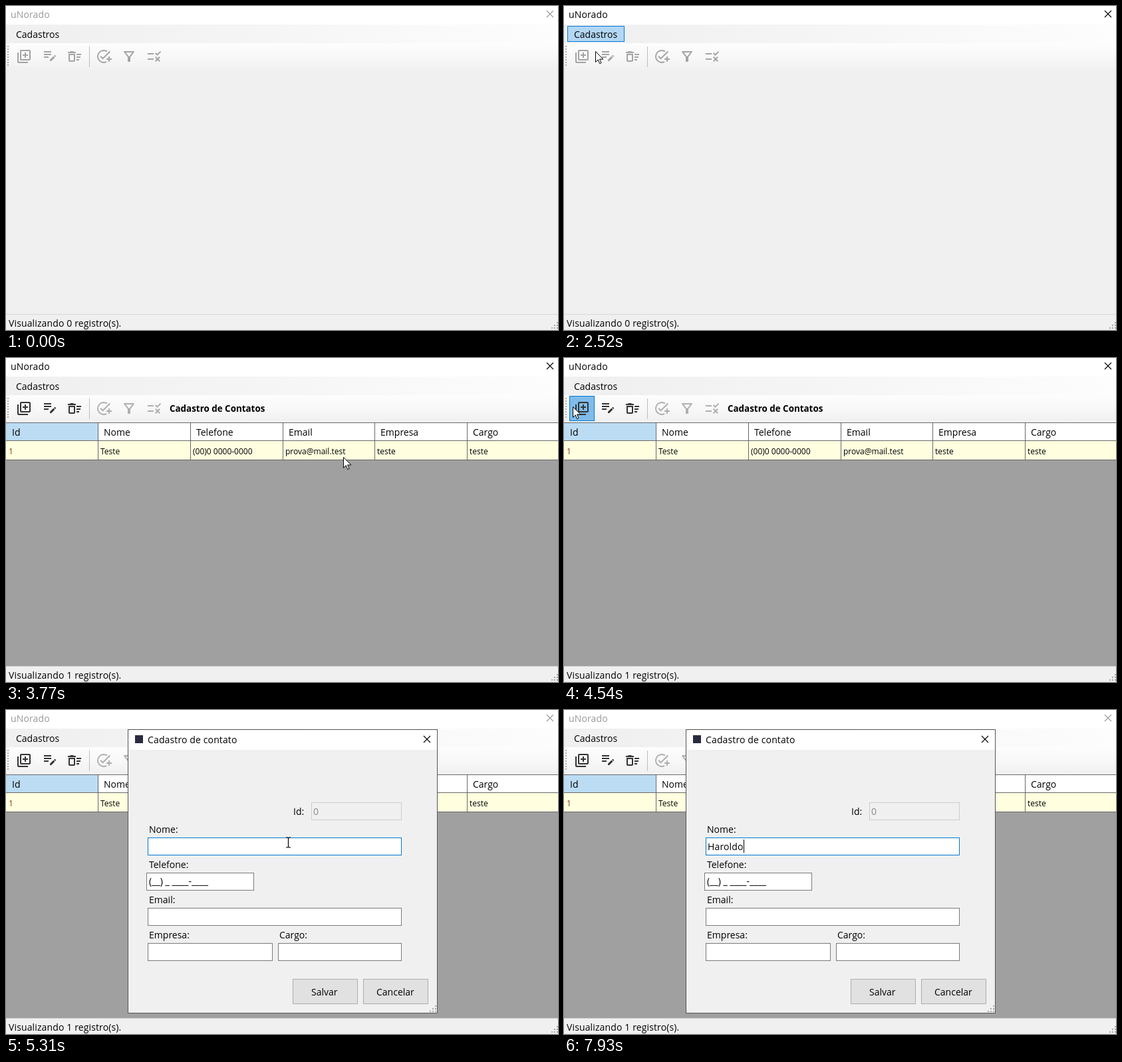
Write an HTML page that moves like this. It is 830x488 px and loops after 8000 ms.

```html
<!DOCTYPE html>
<html lang="pt">
<head>
<meta charset="utf-8">
<style>
html, body { margin: 0; width: 100%; height: 100%; overflow: hidden; background: #f0f0f0; }
svg { display: block; width: 830px; height: 488px; }
text { font: 14px "Open Sans", "Noto Sans", sans-serif; white-space: pre; }
.small { font-size: 12px; }
.bold { font-size: 13.4px; font-weight: 700; }
.wide { letter-spacing: .13px; }
</style>
</head>
<body>
<svg id="stage" viewBox="0 0 830 488">
  <defs>
    <linearGradient id="menuFill"><stop offset=".1" stop-color="#f0f0f0"/><stop offset="1" stop-color="#fdfdfd"/></linearGradient>
    <linearGradient id="toolFill" x2="0" y2="1"><stop offset="0" stop-color="#fdfdfd"/><stop offset=".5" stop-color="#f8f8f8"/><stop offset="1" stop-color="#f0f0f0"/></linearGradient>
  </defs>
</svg>
<script>
const LOOP = 8000, STEP = 70;
const stage = document.getElementById('stage');

function add(parent, tag, attrs, content) {
  const el = document.createElementNS('http://www.w3.org/2000/svg', tag);
  for (const k in attrs) el.setAttribute(k, attrs[k]);
  if (content !== undefined) el.textContent = content;
  return parent.appendChild(el);
}
const group = (parent = stage) => add(parent, 'g', {});
const fillBox = (g, x, y, width, height, fill) => add(g, 'rect', { x, y, width, height, fill });
// Outlined box whose outer edges lie on whole pixels
const frame = (g, x1, y1, x2, y2, fill, stroke) =>
  add(g, 'rect', { x: x1 + .5, y: y1 + .5, width: x2 - x1 - 1, height: y2 - y1 - 1, fill, stroke });
const label = (g, x, y, s, cls = '', fill = '#000') => add(g, 'text', { x, y, fill, class: cls }, s);
const cross = (g, x, y) =>
  add(g, 'path', { d: `M${x} ${y}l10 10m0-10l-10 10`, stroke: '#000', 'stroke-width': 1.1, fill: 'none' });
const show = (el, on) => el.setAttribute('display', on ? 'inline' : 'none');

function sizeGrip(g, x, y) {
  for (let r = 0; r < 3; r++)
    for (let c = 2 - r; c < 3; c++) fillBox(g, x + c * 4 - 1, y + r * 4 - 1, 2, 2, '#a8a8a8');
}

// Window
const win = group();
fillBox(win, 0, 0, 830, 28, '#fff');
fillBox(win, 0, 28, 830, 28, 'url(#menuFill)');
fillBox(win, 0, 56, 830, 41, 'url(#toolFill)');
const title = label(win, 7, 18, 'uNorado', 'wide');
const closeX = cross(win, 813, 7);
const menuHover = frame(win, 5, 30, 91, 54, '#b3d7f3', '#0078d7');
label(win, 15, 48, 'Cadastros');
for (let y = 60; y < 91; y += 4) fillBox(win, 2, y, 2, 2, '#a9a9a9');
fillBox(win, 125, 61, 1, 31, '#bdbdbd');
fillBox(win, 0, 464, 830, 1, '#d7d7d7');
const status = label(win, 4, 483, '', 'wide');
sizeGrip(win, 821, 477);

// Toolbar
const icons = [
  [15, 64, 'M4 6H2v14c0 1.1.9 2 2 2h14v-2H4V6zm16-4H8c-1.1 0-2 .9-2 2v12c0 1.1.9 2 2 2h12c1.1 0 2-.9 2-2V4c0-1.1-.9-2-2-2zm0 14H8V4h12v12zm-7-2h2v-3h3V9h-3V6h-2v3h-3v2h3z'],
  [54, 62, 'M3 10h11v2H3zM3 8h11V6H3zm0 8h7v-2H3zm15-3.1.7-.7c.4-.4 1-.4 1.4 0l.7.7c.4.4.4 1 0 1.4l-.7.7zm-.7.7L12 18.9V21h2.1l5.3-5.3z'],
  [91, 64, 'M15 16h4v2h-4zm0-8h7v2h-7zm0 4h6v2h-6zM3 18c0 1.1.9 2 2 2h6c1.1 0 2-.9 2-2V8H3zm2-8h6v8H5zm5-6H6L5 5H2v2h12V5h-3z'],
  [135, 64, 'M22 5.2 10.6 16.6l-4.2-4.2L7.8 11l2.8 2.8 10-10zM12 20a8 8 0 1 1 4.3-14.7l1.4-1.5A10 10 0 1 0 16.8 20.8l-1.5-1.5c-1 .5-2.1.7-3.3.7zm7-5h-3v2h3v3h2v-3h3v-2h-3v-3h-2z'],
  [173, 64, 'M7 6h10l-5 6.3zM4.3 5.6 10 13v6c0 .6.4 1 1 1h2c.6 0 1-.4 1-1v-6l5.7-7.4c.5-.7 0-1.6-.8-1.6H5c-.8 0-1.3.9-.7 1.6z'],
  [211, 64, 'M16.5 11 13 7.5 14.4 6l2.1 2.2 4.3-4.3 1.4 1.4zM11 7H2v2h9zm10 6.4L19.6 12 17 14.6 14.4 12 13 13.4l2.6 2.6-2.6 2.6 1.4 1.4 2.6-2.6 2.6 2.6 1.4-1.4-2.6-2.6zM11 15H2v2h9z']
];
const hovers = [8, 46, 84].map(x => frame(win, x, 57, x + 38, 95, '#b3d7f3', '#0078d7'));
const glyphs = icons.map(([x, y, d]) =>
  add(win, 'path', { d, transform: `translate(${x} ${y})`, 'fill-rule': 'evenodd' }));

// Contact list
const grid = group();
label(grid, 246, 81, 'Cadastro de Contatos', 'bold');
fillBox(grid, 0, 97, 830, 367, '#a0a0a0');
fillBox(grid, 0, 97, 830, 28, '#fff');
fillBox(grid, 0, 97, 138, 28, '#bcdcf4');
fillBox(grid, 0, 125, 830, 28, '#ffffe0');
for (const y of [97, 124, 153]) fillBox(grid, 0, y, 830, 1, '#696969');
const edges = [138, 277, 416, 554, 693];
edges.forEach(x => fillBox(grid, x, 97, 1, 57, '#696969'));
const columns = [['Id', '1'], ['Nome', 'Teste'], ['Telefone', '(00)0 0000-0000'],
  ['Email', 'prova@mail.test'], ['Empresa', 'teste'], ['Cargo', 'teste']];
const heads = columns.map(([head, cell], i) => {
  const x = i ? edges[i - 1] : 0;
  label(grid, x + 4, 145, cell, 'small', i ? '#000' : '#8b3a10');
  return label(grid, x + 9, 117, head);
});
const headGap = fillBox(grid, 693, 98, 1, 26, '#e8e8e8');

// Dialog
const dialog = group();
frame(dialog, 183, 29, 649, 457, '#f0f0f0', '#555');
fillBox(dialog, 184, 30, 464, 30, '#fff');
fillBox(dialog, 194, 38, 12, 12, '#2b2b40');
label(dialog, 213, 50, 'Cadastro de contato', 'wide');
cross(dialog, 628, 39);
[[432, 158, 'Id:'], [215, 185, 'Nome:'], [215, 238, 'Telefone:'], [215, 291, 'Email:'],
  [215, 344, 'Empresa:'], [411, 344, 'Cargo:']].forEach(a => label(dialog, ...a));
frame(dialog, 459, 139, 595, 166, '#f0f0f0', '#ccc');
label(dialog, 462, 158, '0', '', '#8a8a8a');
frame(dialog, 213, 192, 595, 219, '#fff', '#0078d7');
[[211, 245, 373], [213, 298, 595], [213, 351, 401], [409, 351, 595]]
  .forEach(([x, y, x2]) => frame(dialog, x, y, x2, y + 27, '#fff', '#7a7a7a'));
label(dialog, 215, 263, '(__) _ ____-____');
[[431, 529, 459, 'Salvar'], [537, 635, 557, 'Cancelar']].forEach(([x, x2, tx, s]) => {
  frame(dialog, x, 405, x2, 443, '#e1e1e1', '#adadad');
  label(dialog, tx, 430, s);
});
sizeGrip(dialog, 638, 446);
const nameText = label(dialog, 216, 211, '', 'wide');
const caret = fillBox(dialog, 216, 195, 1, 20, '#000');

// Pointers
const arrow = add(stage, 'path', { d: 'M.5.5v16l3.7-3.6 2.5 5.8 2.4-1-2.5-5.6h5.2z', fill: '#fff', stroke: '#000' });
const beam = add(stage, 'path', { d: 'M-3.5-7.5h2.5l1 1 1-1h2.5M0-6.5v13M-3.5 7.5h2.5l1-1 1 1h2.5', fill: 'none', stroke: '#000', 'stroke-width': 1.2 });

// start, end, target x, target y
const moves = [[110, 870, 65, 57], [940, 1010, 67, 46], [2030, 2590, 46, 69], [3060, 3770, 507, 149],
  [3910, 4470, 13, 73], [4750, 5170, 432, 201], [5170, 5310, 424, 199]];
const ease = p => p * p * (3 - 2 * p);

function pointer(t) {
  let x = 715, y = 466;
  for (const [start, end, tx, ty] of moves) {
    if (t < start) break;
    const n = Math.floor((end - start) / STEP) + 1;
    const p = ease(Math.min(1, (Math.floor((t - start) / STEP) + 1) / n));
    x += (tx - x) * p;
    y += (ty - y) * p;
  }
  return [Math.round(x), Math.round(y)];
}

const NAME = 'Haroldo';
const erase = [6870, 7000, 7200, 7330], retype = [7600, 7710, 7820, 7930];
function typed(t) {
  const past = list => list.filter(k => t >= k).length;
  const first = Math.max(0, Math.min(6, Math.floor((t - 5770) / 80)));
  return NAME.slice(0, first + (t >= 6470) - past(erase) + past(retype));
}

function draw(t) {
  const list = t >= 2590, form = t >= 4680, ready = t >= 2730;
  const [x, y] = pointer(t);
  const active = t >= 1160 && !form;

  title.setAttribute('fill', active ? '#000' : '#999');
  closeX.setAttribute('stroke', active ? '#000' : '#999');
  show(menuHover, t >= 940 && !list);
  status.textContent = `Visualizando ${ready ? 1 : 0} registro(s).`;

  glyphs.forEach((g, i) => g.setAttribute('fill', list ? (i < 3 ? '#333' : '#aeaeae') : '#a3a3a3'));
  hovers.forEach((h, i) => {
    const left = 8 + i * 38;
    show(h, list && !form && y >= 57 && y < 95 && x > left - (i ? 0 : 1) && x <= left + 38);
  });
  hovers[0].setAttribute('fill', t >= 4540 ? '#80bceb' : '#b3d7f3');

  show(grid, list);
  show(heads[4], ready);
  show(headGap, !ready);

  show(dialog, form);
  nameText.textContent = typed(t);
  caret.setAttribute('x', Math.round(216 + (nameText.textContent ? nameText.getComputedTextLength() : 0)));
  show(caret, t >= 5770);

  const inField = form && x > 213 && x < 595 && y > 192 && y < 219;
  show(arrow, t >= 110 && t < 5770 && !inField);
  show(beam, inField && t < 5770);
  arrow.setAttribute('transform', `translate(${x} ${y})`);
  beam.setAttribute('transform', `translate(${x + .5} ${y + .5})`);
}

const begin = performance.now();
function tick() {
  draw((performance.now() - begin) % LOOP);
  requestAnimationFrame(tick);
}
tick();
</script>
</body>
</html>
```
